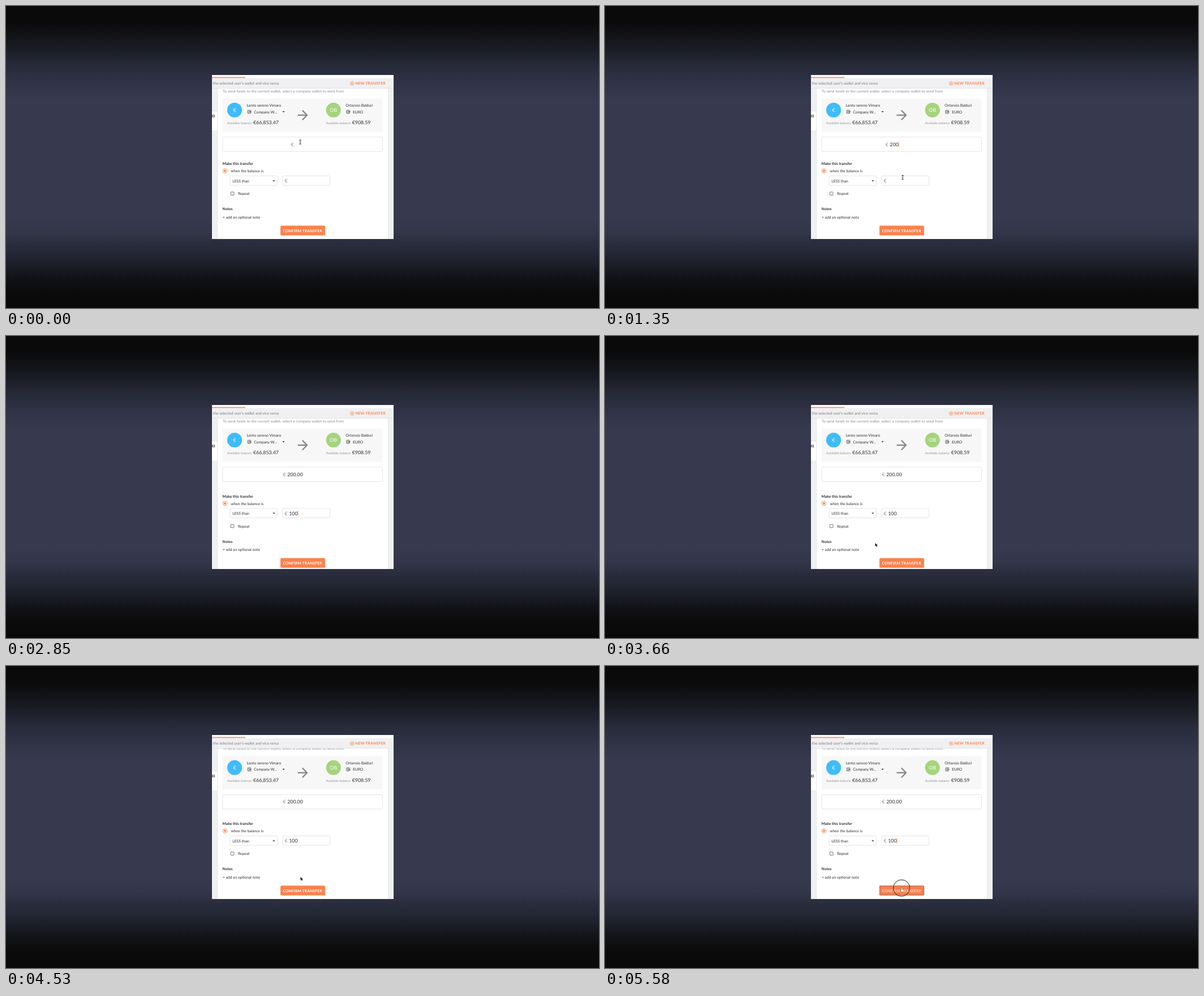
Animation, 1048 px wide and 534 px high, one loop 5.61 s. Source, as an HTML page with a canvas:

```html
<!DOCTYPE html>
<html lang="en">
<head>
<meta charset="utf-8">
<title>Transfer form</title>
<style>
html, body { margin: 0; width: 100%; height: 100%; overflow: hidden; background: #0a0a0a; }
canvas { display: block; width: 1048px; height: 534px; }
</style>
</head>
<body>
<canvas id="stage"></canvas>
<script>
const W = 1048, H = 534, LOOP = 5610, STEP = 30;
const ORANGE = '#fa824d', INK = '#2d2e33', GREY = '#8b8c90', LINE = '#dcdddf';
const canvas = document.getElementById('stage');
const ctx = canvas.getContext('2d');
const ratio = window.devicePixelRatio || 1;
canvas.width = W * ratio;
canvas.height = H * ratio;

const backdrop = ctx.createLinearGradient(0, 0, 0, H);
[[0, '#0a0a0a'], [28, '#0a0a0a'], [75, '#1a1c25'], [100, '#252835'],
 [130, '#2f3244'], [165, '#37394e'], [375, '#37394e'], [400, '#333649'],
 [420, '#2a2d3d'], [450, '#1f222d'], [480, '#121318'], [506, '#0a0a0a'], [534, '#0a0a0a']
].forEach(([y, c]) => backdrop.addColorStop(y / H, c));

const smooth = p => p * p * (3 - 2 * p);
const phase = (t, a, b) => Math.min(1, Math.max(0, (t - a) / (b - a)));
const ease = (t, a, b) => smooth(phase(t, a, b));

// Pointer path: time, x, y
const PATH = [
  [0, 520, 240.5], [1110, 520, 240.5], [1320, 526, 303], [1500, 526.5, 305],
  [3150, 526.5, 305], [3600, 477.5, 366], [3750, 477.5, 366],
  [4440, 520.5, 373], [4560, 520.5, 373], [4980, 525, 396], [LOOP, 525, 396]
];
const CLICKS = [60, 1500, 5430];

function pointerAt(t) {
  const i = PATH.findIndex((p, k) => k && t <= p[0]);
  const [t0, x0, y0] = PATH[i - 1], [t1, x1, y1] = PATH[i];
  const p = ease(t, t0, t1);
  return [x0 + (x1 - x0) * p, y0 + (y1 - y0) * p];
}

function typed(word, t, times) {
  return word.slice(0, times.filter(k => t >= k).length);
}

function text(s, x, y, { size = 6.7, color = INK, weight = 400, align = 'left', spacing = 0 } = {}) {
  ctx.font = `${weight} ${size}px Lato, sans-serif`;
  ctx.letterSpacing = spacing + 'px';
  ctx.textAlign = align;
  ctx.fillStyle = color;
  ctx.fillText(s, x, y + size * 0.36);
  return ctx.measureText(s).width;
}

function rect(x, y, w, h, color) {
  ctx.fillStyle = color;
  ctx.fillRect(x, y, w, h);
}

function box(x, y, w, h, fill, stroke, r = 2) {
  ctx.beginPath();
  ctx.roundRect(x, y, w, h, r);
  ctx.fillStyle = fill;
  ctx.fill();
  if (stroke) outline(stroke, 0.8);
}

function outline(color, width) {
  ctx.strokeStyle = color;
  ctx.lineWidth = width;
  ctx.stroke();
}

function disc(x, y, r, color) {
  ctx.beginPath();
  ctx.arc(x, y, r, 0, 7);
  ctx.fillStyle = color;
  ctx.fill();
}

function ring(x, y, r, color, width) {
  ctx.beginPath();
  ctx.arc(x, y, r, 0, 7);
  outline(color, width);
}

function poly(points, close) {
  ctx.beginPath();
  points.forEach(([x, y]) => ctx.lineTo(x, y));
  if (close) ctx.closePath();
}

function triangle(x, y) {
  poly([[x - 2.1, y - 1], [x + 2.1, y - 1], [x, y + 1.2]], true);
  ctx.fillStyle = INK;
  ctx.fill();
}

function walletIcon(x, y) {
  box(x + 0.4, y - 2.8, 5.8, 5.8, '#b9babd', '#66676b', 0.8);
  rect(x + 3, y - 1.3, 3.8, 2.8, '#f7f7f7');
  rect(x + 3.4, y - 0.9, 3.4, 2, '#66676b');
}

function wallet(x, color, initials, name, kind, balance) {
  disc(x + 13, 184, 13.1, color);
  text(initials, x + 13, 184.2, { size: 8.8, color: '#fff', align: 'center' });
  text(name, x + 34.6, 175.8);
  walletIcon(x + 35.7, 187);
  text(kind, x + 47.2, 187.1);
  text('Available balance', x, 207, { size: 5.75, color: '#97989b' });
  text(balance, x + 46, 206, { size: 8.8 });
}

function caret(x, y) {
  rect(x + 0.2, y - 5, 0.8, 10, ORANGE);
}

function drawTop(t, amount) {
  text('To send funds to the current wallet, select a company wallet to send from',
    383, 150.3, { color: GREY });
  rect(382.5, 163.5, 283, 59, '#f7f7f7');
  wallet(391, '#3fbcfa', '€', 'Lento sereno Vimaro', 'Company W...', '€66,853.47');
  triangle(490.5, 187);
  wallet(565.7, '#a5d47d', 'OB', 'Ortensio Balduri', 'EURO', '€908.59');
  ctx.lineCap = 'butt';
  poly([[515.5, 193], [531.5, 193]]);
  outline('#85868a', 2.3);
  poly([[523.8, 184.5], [532, 193], [523.8, 201.5]]);
  outline('#85868a', 2.3);

  box(382.9, 231.7, 282.4, 25.6, '#fff', LINE);
  ctx.font = '400 8.8px Lato, sans-serif';
  ctx.letterSpacing = '0px';
  const half = ctx.measureText(amount).width / 2;
  text('€', 511 - half - 7.6, 244.5, { size: 8.8, color: GREY });
  text(amount, 511 - half, 244.5, { size: 8.8 });
  if (t >= 90 && t < 1500) caret(511 + half, 244.5);
}

function drawForm(t, limit) {
  text('Make this transfer', 382.6, 278.8, { weight: 700 });
  ring(387, 291.6, 3.8, ORANGE, 0.9);
  disc(387, 291.6, 2, ORANGE);
  text('when the balance is', 397.2, 291.8);
  box(395.9, 300.4, 83.6, 16.8, '#fff', LINE);
  text('LESS than', 400.3, 309.2);
  triangle(473.3, 309.2);
  box(488.9, 300.4, 83.6, 16.8, '#fff', LINE);
  text('€', 492.6, 309.1, { size: 8.8, color: GREY });
  const w = text(limit, 500.2, 309.1, { size: 8.8 });
  const blink = t < 2250 ? t >= 1500 && t < 2010
    : t < 2700 ? t >= 2310 : (t - 2700) % 1200 < 600;
  if (blink) caret(500.2 + w, 309.1);

  box(397.3, 328.9, 5.6, 5.6, '#fff', '#55565a', 0.6);
  text('Repeat', 410, 331.8);
  text('Notes', 382.6, 359, { weight: 700 });
  text('+ add an optional note', 383, 373.2);

  ctx.shadowColor = 'rgba(0,0,0,.22)';
  ctx.shadowBlur = 2 * ratio;
  ctx.shadowOffsetY = 0.6 * ratio;
  const pressed = t >= 5490;
  box(485.2, 388.5, 78.6, 16.8, pressed ? '#f58050' : ORANGE, null, 1.6);
  ctx.shadowColor = 'transparent';
  text('CONFIRM TRANSFER', 489.4, 397.1,
    { color: pressed ? '#ffdac8' : '#fff', weight: 700, spacing: 0.18 });
  if (pressed) {
    ctx.setLineDash([1.2, 1]);
    ctx.beginPath();
    ctx.rect(485.6, 388.9, 77.8, 16);
    outline('#6b3d29', 0.8);
    ctx.setLineDash([]);
  }
}

function drawChrome() {
  rect(364, 122, 321, 6, '#fff');
  rect(364, 125.5, 59, 2, '#f5906a');
  rect(364, 127.5, 321, 18, '#f0f0f2');
  rect(364, 145.2, 321, 0.7, '#dcdde0');
  text("the selected user's wallet and vice versa", 365.8, 136.9, { color: '#7b7c80' });
  ring(611.7, 137, 3.2, ORANGE, 0.8);
  poly([[610, 137], [613.4, 137]]);
  outline(ORANGE, 0.8);
  poly([[611.7, 135.3], [611.7, 138.7]]);
  outline(ORANGE, 0.8);
  text('NEW TRANSFER', 617.2, 136.9, { color: ORANGE, weight: 700, spacing: 0.2 });
}

function drawPointer(t) {
  const hidden = (t >= 570 && t < 1110) || (t >= 2280 && t < 3150);
  if (hidden) return;
  const [x, y] = pointerAt(t);
  if (y < 256 || (y > 300 && y < 317 && t < 3300)) {
    ctx.lineCap = 'butt';
    poly([[x, y - 3.2], [x, y + 3.2]]);
    outline('#222', 1);
    for (const end of [-3.6, 3.6]) {
      poly([[x - 1.7, y + end], [x + 1.7, y + end]]);
      outline('#222', 0.9);
    }
  } else if (y > 388) {
    ctx.beginPath();
    ctx.roundRect(x - 1.2, y - 4, 1.8, 5, 0.9);
    ctx.roundRect(x - 2.1, y - 0.8, 5, 4.2, 1.5);
    ctx.fillStyle = '#fff';
    outline('#222', 0.9);
    ctx.fill();
  } else {
    poly([[0, 0], [0, 6], [1.4, 4.8], [2.4, 7], [3.5, 6.5], [2.5, 4.4], [4.3, 4.3]]
      .map(([a, b]) => [x + a, y + b]), true);
    outline('#fff', 0.8);
    ctx.fillStyle = '#111';
    ctx.fill();
  }
  for (const start of CLICKS) {
    if (t < start || t >= start + 180) continue;
    const r = 5 + 9.6 * ease(t, start, start + 120);
    ring(x - 1, Math.min(y, 392.6), r, '#222', 1);
  }
}

function draw(t) {
  const amount = t >= 1530 ? '200.00' : typed('200', t, [660, 840, 990]);
  const limit = typed('100', t, [2370, 2550, 2700]);
  const grow = 4.3 * ease(t, 1530, 1710);
  const scroll = 4.3 * ease(t, 3780, 4080);

  ctx.setTransform(ratio, 0, 0, ratio, 0, 0);
  ctx.textRendering = 'geometricPrecision';
  rect(0, 0, W, H, backdrop);
  ctx.save();
  ctx.beginPath();
  ctx.rect(364, 122, 321, 290);
  ctx.clip();
  rect(364, 122, 321, 290, '#eff0f2');
  rect(364, 186, 10, 35, '#fff');
  rect(364, 185.6, 10, 0.6, LINE);
  rect(364, 220.6, 10, 0.6, LINE);
  text('00', 369.3, 195, { weight: 700, align: 'right' });
  rect(373.3, 145, 302.4, 267, '#dfe0e3');
  rect(374, 145, 301, 267, '#fff');

  ctx.translate(0, -scroll);
  drawTop(t, amount);
  ctx.translate(0, grow);
  drawForm(t, limit);
  ctx.translate(0, scroll - grow);
  drawChrome();
  drawPointer(t);
  ctx.restore();
}

const begin = performance.now();
function tick() {
  const t = (performance.now() - begin) % LOOP;
  draw(Math.floor(t / STEP) * STEP);
  requestAnimationFrame(tick);
}
tick();
</script>
</body>
</html>
```
